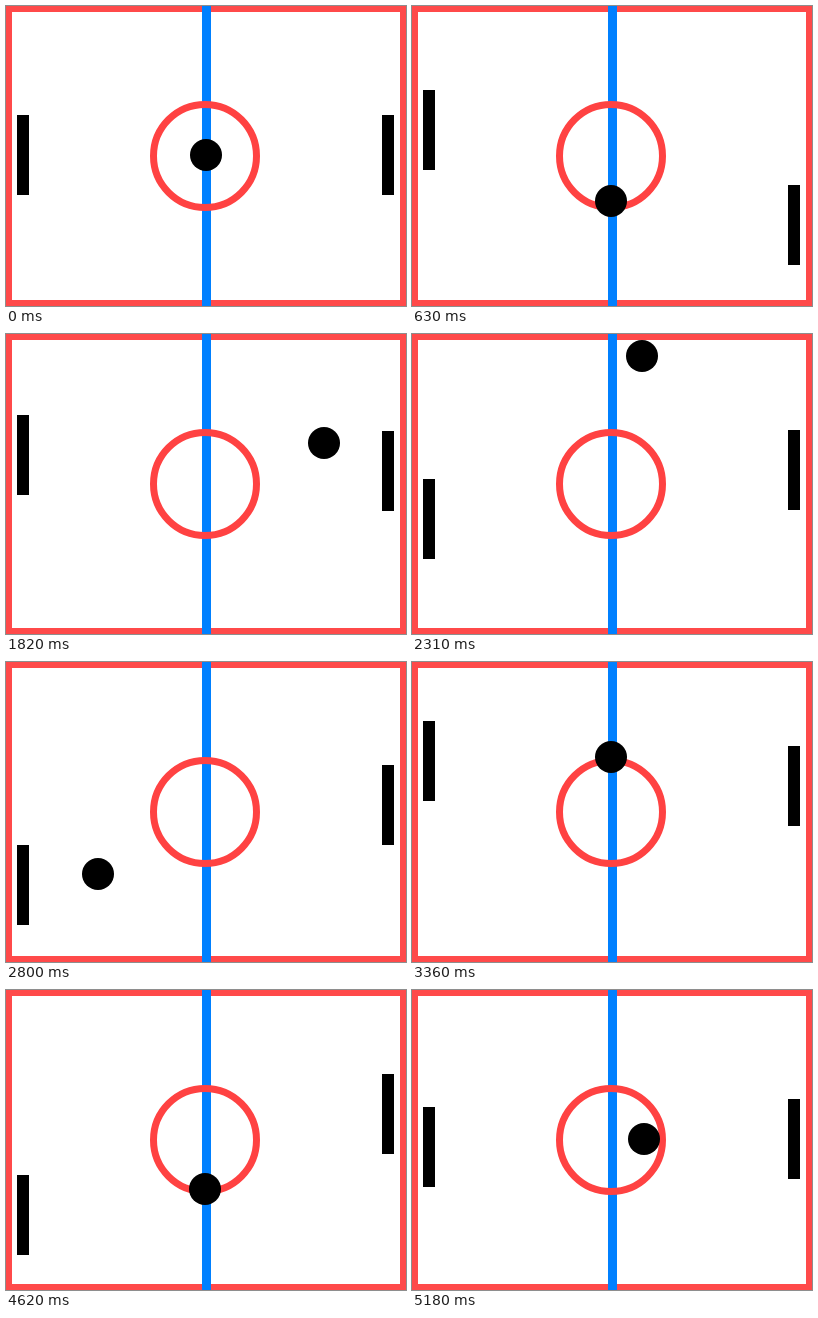
Recreate the animation shown at these times as an HTML page. Size 400 px wide and 300 px high, loop 5.25 s.

```html
<!DOCTYPE html>
<html lang="en">
<head>
<meta charset="utf-8">
<title>Paddle game</title>
<style>
  html, body { margin: 0; width: 100%; height: 100%; overflow: hidden; background: #fff; }
  svg { display: block; width: 400px; height: 300px; }
</style>
</head>
<body>
<svg viewBox="0 0 400 300">
  <rect x="3" y="3" width="394" height="294" fill="#fff" stroke="#ff4a4a" stroke-width="6"/>
  <rect x="196" width="9" height="300" fill="#0080ff"/>
  <circle cx="199" cy="150" r="51.5" fill="none" stroke="#ff4242" stroke-width="7"/>
  <rect id="left" x="11" width="12" height="80"/>
  <rect id="right" x="376" width="12" height="80"/>
  <circle id="ball" r="16"/>
</svg>
<script>
const STEP = 70;            // ms per move
const REST = 109;           // paddle top when centred
const MIDDLE = 40;          // half a paddle
const WALL = 22;            // ball centre when touching the top wall
const CONTACT = [39, 360];  // ball centre when touching each paddle

const ball = [{ step: 0, x: 200, y: REST + MIDDLE }];
const paddles = [[{ step: 0, y: REST }], [{ step: 0, y: REST }]];
let now = 0, side = 0;

function pass(gap, x, y) {
  now += gap;
  ball.push({ step: now, x, y });
}

// The paddles take turns; offset is where on the paddle the ball lands.
function hit(top, offset = MIDDLE, gap = 6) {
  pass(gap, CONTACT[side], top + offset);
  paddles[side].push({ step: now, y: top });
  side = 1 - side;
}

hit(REST);
hit(202);
hit(9, 34);
pass(3, 108, WALL);
hit(89, 37);
pass(6, 230, WALL);
hit(199, 26);
hit(REST);
hit(12, 29);
hit(8, 46);
hit(210, 39);
hit(REST);
pass(3, 296, REST + MIDDLE);
pass(3, 200, REST + MIDDLE);
for (const keys of paddles) keys.push({ step: now, y: REST });

// Linear motion between keys, on whole pixels.
function at(keys, step, axis) {
  const i = keys.findIndex(key => key.step > step);
  const a = keys[i - 1], b = keys[i];
  const part = (step - a.step) / (b.step - a.step);
  return Math.ceil(a[axis] + (b[axis] - a[axis]) * part - 0.5);
}

const [leftEl, rightEl, ballEl] = ['left', 'right', 'ball'].map(id => document.getElementById(id));
const start = performance.now();

function draw() {
  const step = Math.floor((performance.now() - start) / STEP) % now;
  leftEl.setAttribute('y', at(paddles[0], step, 'y'));
  rightEl.setAttribute('y', at(paddles[1], step, 'y'));
  ballEl.setAttribute('cx', at(ball, step, 'x'));
  ballEl.setAttribute('cy', at(ball, step, 'y'));
  requestAnimationFrame(draw);
}
draw();
</script>
</body>
</html>
```
